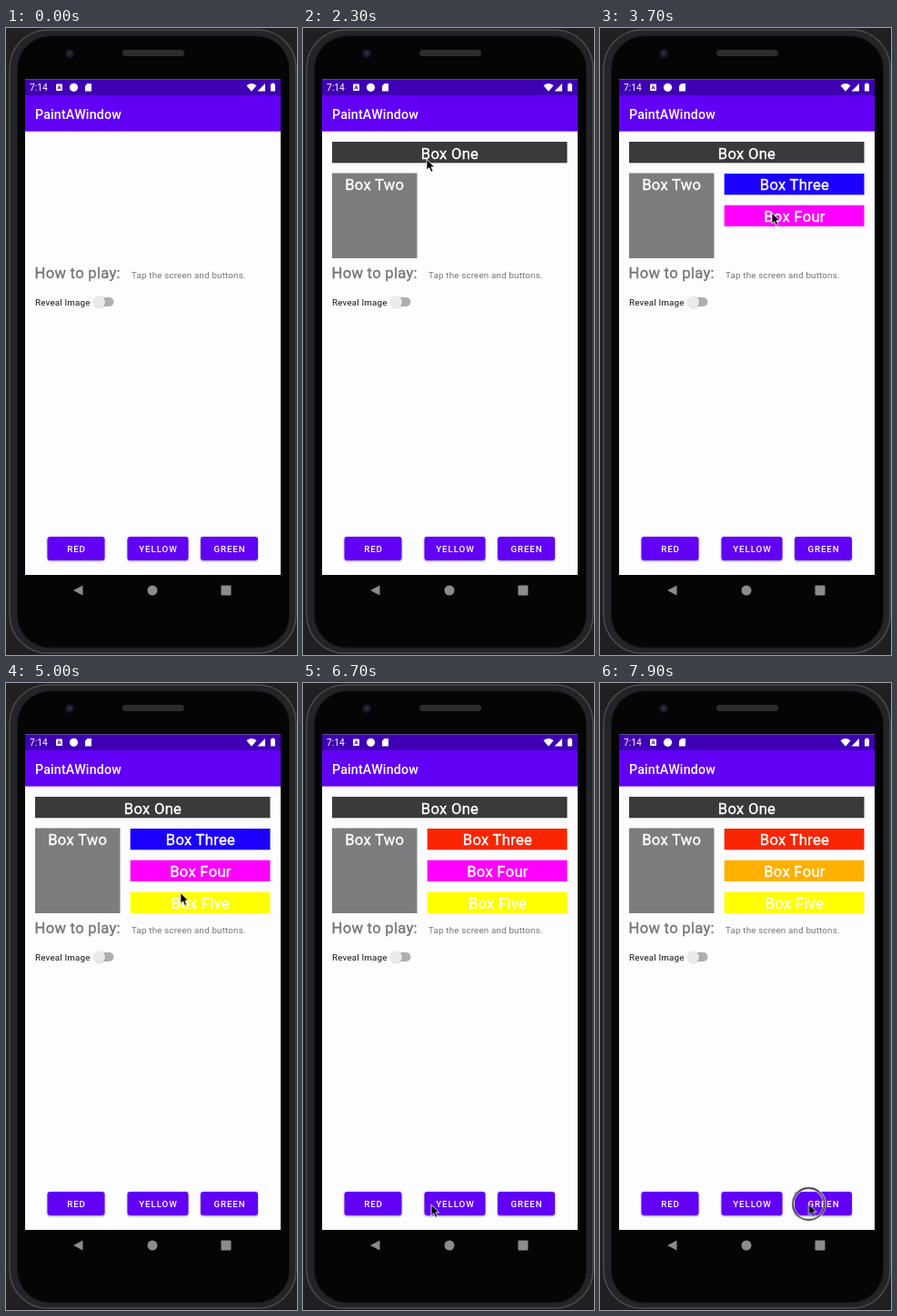
Write an HTML page that moves like this. It is 320x689 px and loops after 8 s.

```html
<!DOCTYPE html>
<html lang="en">
<head>
<meta charset="utf-8">
<title>Box colours</title>
<style>
html, body { margin: 0; width: 100%; height: 100%; overflow: hidden; background: #202022; }
svg { display: block; width: 100vw; height: 100vh; }
text { font-family: Roboto, sans-serif; font-size: 9.8px; letter-spacing: .0178em; }
.title { font-size: 14.2px; font-weight: 500; letter-spacing: .0125em; fill: #fff; }
.large { font-size: 16.6px; stroke-width: .35px; }
.heading { fill: #747474; stroke: #747474; }
.button rect { fill: #6200f6; filter: drop-shadow(0 1px 1px #0006); }
.button text { fill: #fff; font-weight: 500; letter-spacing: .0893em; text-anchor: middle; }
.box text { fill: #fff; stroke: #fff; text-anchor: middle; }

.box, .cursor, .press { visibility: hidden; animation: show 8s step-end infinite; }
.one { animation-name: show-one; }
.two { animation-name: show-two; }
.three { animation-name: show-three; }
.four { animation-name: show-four; }
.five { animation-name: show-five; }
.three rect { animation: redden 8s step-end infinite; }
.four rect { animation: amber 8s step-end infinite; }
.cursor { animation: show-cursor 8s step-end infinite, travel 8s linear infinite; }
.press { animation-name: press; }

@keyframes show-two { 0% { visibility: hidden } 10%, 100% { visibility: visible } }
@keyframes show-one { 0% { visibility: hidden } 26.25%, 100% { visibility: visible } }
@keyframes show-three { 0% { visibility: hidden } 37.5%, 100% { visibility: visible } }
@keyframes show-four { 0% { visibility: hidden } 45%, 100% { visibility: visible } }
@keyframes show-five { 0% { visibility: hidden } 56.25%, 100% { visibility: visible } }
@keyframes redden { 0% { fill: #1c00ff } 76.25%, 100% { fill: #f92500 } }
@keyframes amber { 0% { fill: #ff00ff } 87.5%, 100% { fill: #ffb000 } }
@keyframes show-cursor { 0% { visibility: hidden } 5%, 100% { visibility: visible } }
@keyframes press {
  0%, 10%, 26.25%, 37.5%, 45%, 56.25%, 76.25%, 87.5% { visibility: hidden }
  7.5%, 23.75%, 35%, 42.5%, 53.75%, 73.75%, 85%, 98.75%, 100% { visibility: visible }
}
@keyframes travel {
  0%, 5% { transform: translate(28px, 222px) }
  7.5% { transform: translate(61px, 199px) }
  12.5%, 18.75% { transform: translate(58px, 199px) }
  23.75%, 31.25% { transform: translate(136px, 144px) }
  35%, 37.5% { transform: translate(174px, 171px) }
  42.5%, 48.75% { transform: translate(189px, 203px) }
  53.75%, 62.5% { transform: translate(192px, 230px) }
  72.5% { transform: translate(72px, 563px) }
  73.75%, 77.5% { transform: translate(72px, 573px) }
  82.5%, 83.75% { transform: translate(141px, 573px) }
  85%, 88.75% { transform: translate(141px, 576px) }
  96.25%, 100% { transform: translate(229.5px, 572.5px) }
}
</style>
</head>
<body>
<svg viewBox="0 0 320 689" preserveAspectRatio="none">
  <!-- Phone -->
  <rect width="320" height="689" fill="#202022"/>
  <rect x="4" y="2" width="315" height="685" rx="42" fill="#232427" stroke="#4a4b4e" stroke-width="1.5"/>
  <rect x="12.5" y="9" width="299" height="672" rx="36" fill="#050506" stroke="#151517"/>
  <rect x="128" y="24" width="68" height="7" rx="3.5" fill="#2c2c2e"/>
  <circle cx="70" cy="28" r="5" fill="#17171f"/>
  <circle cx="70" cy="28" r="2.5" fill="#292947"/>

  <!-- Screen and bars -->
  <rect x="21" y="56.5" width="281" height="544.5" fill="#fdfcff"/>
  <rect x="21" y="113" width="281" height="1.5" fill="#ddd9e4"/>
  <rect x="21" y="56.5" width="281" height="17.5" fill="#3f00b3"/>
  <rect x="21" y="74" width="281" height="39.5" fill="#6200f6"/>
  <text x="26" y="69" fill="#fff" style="font-size:10.2px;letter-spacing:0">7:14</text>
  <g fill="#fff">
    <rect x="55" y="61.5" width="7" height="7.5" rx="1"/>
    <circle cx="74.5" cy="65.3" r="4.6"/>
    <path d="M89.5 61H94V69.5H87V63.5Z"/>
    <path d="M264.5 63.2Q270 58.8 275.5 63.2L270 69.7Z"/>
    <path d="M285 61V69.5H276.5Z"/>
    <path d="M291 61.5H292.5V60.5H294.5V61.5H296V69.5H291Z"/>
  </g>
  <path d="M56.8 67.5L58.5 63.2 60.2 67.5M57.5 66H59.5" fill="none" stroke="#3f00b3" stroke-width=".9"/>
  <text class="title" x="32" y="99.5">PaintAWindow</text>
  <g fill="#8c8c8c">
    <path d="M84.5 612.5V623.5L74 618Z"/>
    <circle cx="161" cy="618" r="5.5"/>
    <rect x="236.5" y="612.5" width="11" height="11" rx="1"/>
  </g>

  <!-- Boxes -->
  <g class="box one">
    <rect x="32" y="125" width="258.5" height="23.3" fill="#3a393b"/>
    <text class="large" x="161.5" y="143.5">Box One</text>
  </g>
  <g class="box two">
    <rect x="32" y="159.5" width="93.5" height="93.5" fill="#7d7c7e"/>
    <text class="large" x="78.8" y="178">Box Two</text>
  </g>
  <g class="box three">
    <rect x="136.7" y="160" width="153.8" height="23.3"/>
    <text class="large" x="214" y="178.3">Box Three</text>
  </g>
  <g class="box four">
    <rect x="136.7" y="194.7" width="153.8" height="23.3"/>
    <text class="large" x="214" y="213">Box Four</text>
  </g>
  <g class="box five">
    <rect x="136.7" y="229.7" width="153.8" height="23.3" fill="#ffff00"/>
    <text class="large" x="214" y="248">Box Five</text>
  </g>

  <!-- Controls -->
  <text class="large heading" x="31.5" y="275">How to play:</text>
  <text x="138" y="275.3" fill="#757575">Tap the screen and buttons.</text>
  <text x="32" y="304.7" fill="#151515">Reveal Image</text>
  <rect x="99" y="296" width="19.5" height="10" rx="5" fill="#b0afb0"/>
  <circle cx="102.7" cy="301.5" r="7" fill="#0002"/>
  <circle cx="102.5" cy="301" r="6.6" fill="#ebeaeb"/>
  <g class="button">
    <rect x="45.5" y="559" width="63" height="26" rx="3"/>
    <text x="77.5" y="575.8">RED</text>
  </g>
  <g class="button">
    <rect x="133.5" y="559" width="67" height="26" rx="3"/>
    <text x="167.5" y="575.8">YELLOW</text>
  </g>
  <g class="button">
    <rect x="214" y="559" width="63" height="26" rx="3"/>
    <text x="246" y="575.8">GREEN</text>
  </g>

  <!-- Pointer -->
  <g class="cursor">
    <g class="press" fill="none">
      <circle r="17.5" stroke="#fff" stroke-width="3"/>
      <circle r="17.5" stroke="#000" stroke-width="1.4"/>
    </g>
    <path d="M0 0V12L2.8 9.6 4.8 14.2 7 13.2 5 8.8H8.6Z" fill="#000" stroke="#fff" stroke-width=".8"/>
  </g>
</svg>
</body>
</html>
```
